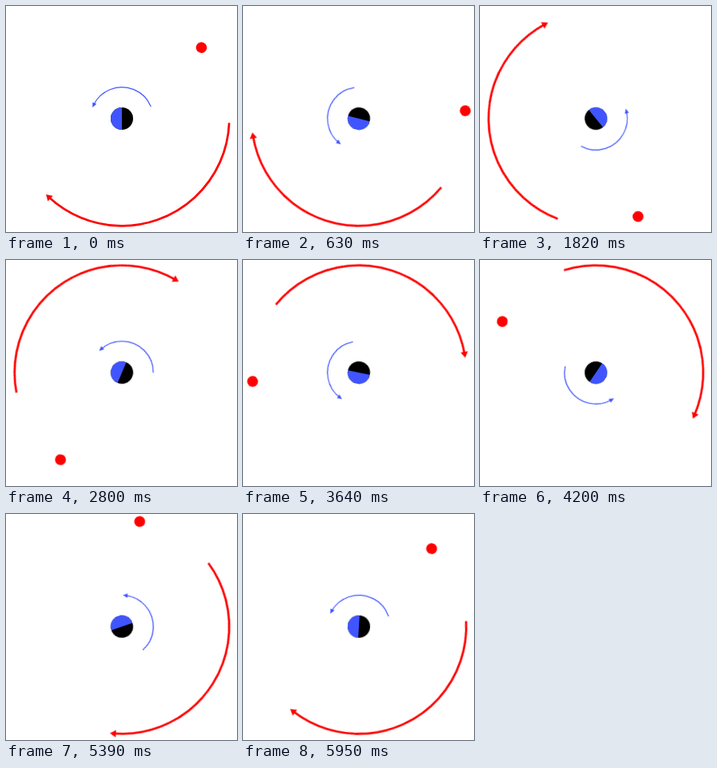
An HTML page that plays this animation: 289x283 px, repeating every 6.02 s.

```html
<!DOCTYPE html>
<html lang="en">
<head>
<meta charset="utf-8">
<title>Orbit and spin</title>
<style>
  html, body { margin: 0; width: 100%; height: 100%; overflow: hidden; background: #fff; }
  svg { display: block; width: 289px; height: 283px; }
  .orbit, .spin { transform-origin: 0 0; animation: orbit 6020ms steps(86) infinite; }
  .spin { animation-name: spin; }
  /* 86 steps: 4.174deg clockwise per step, 8.43deg anticlockwise per step */
  @keyframes orbit { from { transform: rotate(0deg); } to { transform: rotate(358.96deg); } }
  @keyframes spin { from { transform: rotate(0deg); } to { transform: rotate(-724.98deg); } }
  .arc { fill: none; }
  .red { fill: #f00; }
  .blue { fill: #4055ff; }
  .red-line { stroke: #f00; stroke-width: 2.7; }
  .blue-line { stroke: #4055ff; stroke-width: 1.2; }
</style>
</head>
<body>
<svg viewBox="0 0 289 283">
  <g transform="translate(145 141)">
    <g class="spin">
      <circle r="14"/>
      <path class="blue" d="M0-14A14 14 0 0 0 0 14Z"/>
      <g transform="rotate(-22.6) scale(1 -1)">
        <circle class="arc blue-line" r="39.3" pathLength="360" stroke-dasharray="131 360"/>
        <path class="blue" transform="rotate(136.7) translate(39.3 0) rotate(-4.4)" d="M0 0L-2.7-6H2.7Z"/>
      </g>
    </g>
    <g class="orbit">
      <circle class="red" r="6.8" transform="rotate(-41.8) translate(133.4 0)"/>
      <g transform="rotate(2.3)">
        <circle class="arc red-line" r="134.3" pathLength="360" stroke-dasharray="130.5 360"/>
        <path class="red" transform="rotate(132.7) translate(134.3 0) rotate(-1.6)" d="M0 0L-4.5-7.5H4.5Z"/>
      </g>
    </g>
  </g>
</svg>
</body>
</html>
```
